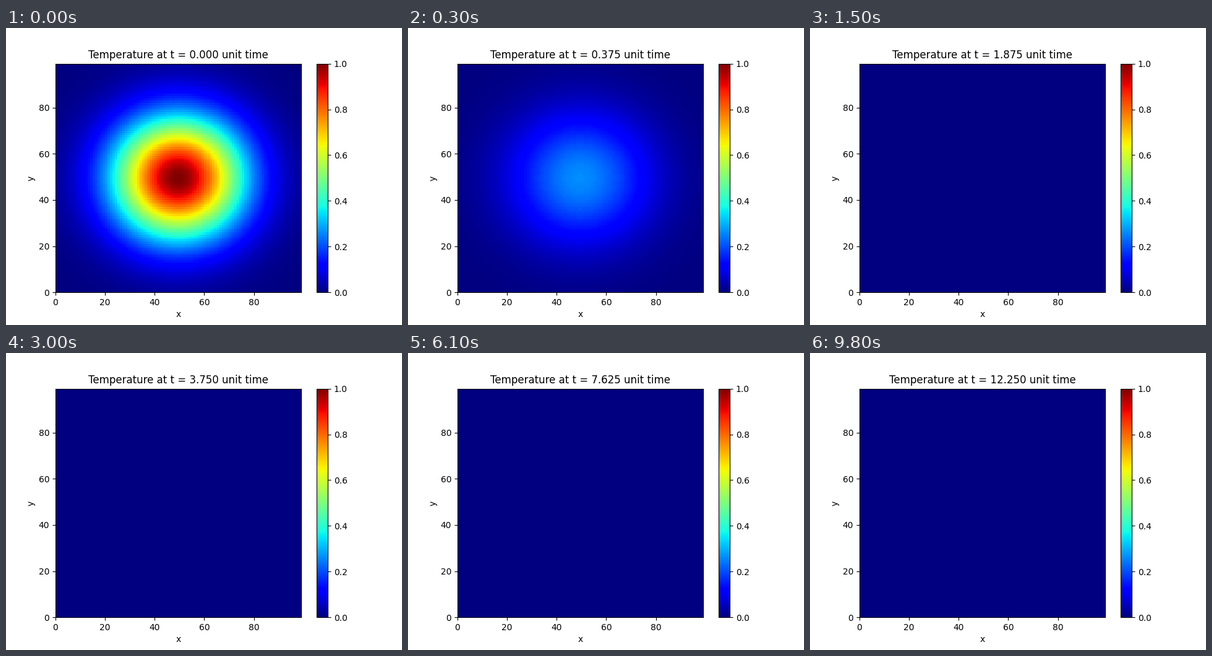
Recreate the animation shown at these times as a matplotlib script. Size 640 by 480 pixels, loop 9900 ms.

```python
import numpy as np
import matplotlib.pyplot as plt
from matplotlib.animation import FuncAnimation

SIZE = 99          # cells per side
FRAMES = 99
STEP = 0.125       # time units per frame
COOLING = 3.56     # decay rate of the peak
SPREAD = 675       # initial squared width, in cells
GROWTH = 240       # widening per time unit

centres = np.arange(SIZE) + 0.5 - SIZE / 2
dist2 = centres[:, None] ** 2 + centres[None, :] ** 2


def temperature(t):
    return np.exp(-COOLING * t - dist2 / (SPREAD + GROWTH * t))


fig, ax = plt.subplots(figsize=(6.4, 4.8), dpi=100)
mesh = ax.pcolormesh(temperature(0), cmap="jet", vmin=0, vmax=1)
fig.colorbar(mesh, ax=ax)
ax.set_xlabel("x")
ax.set_ylabel("y")
title = ax.set_title("")


def update(frame):
    t = frame * STEP
    mesh.set_array(temperature(t))
    title.set_text(f"Temperature at t = {t:.3f} unit time")
    return mesh, title


anim = FuncAnimation(fig, update, frames=FRAMES, interval=100,
                     repeat=True, repeat_delay=0)
plt.show()
```
